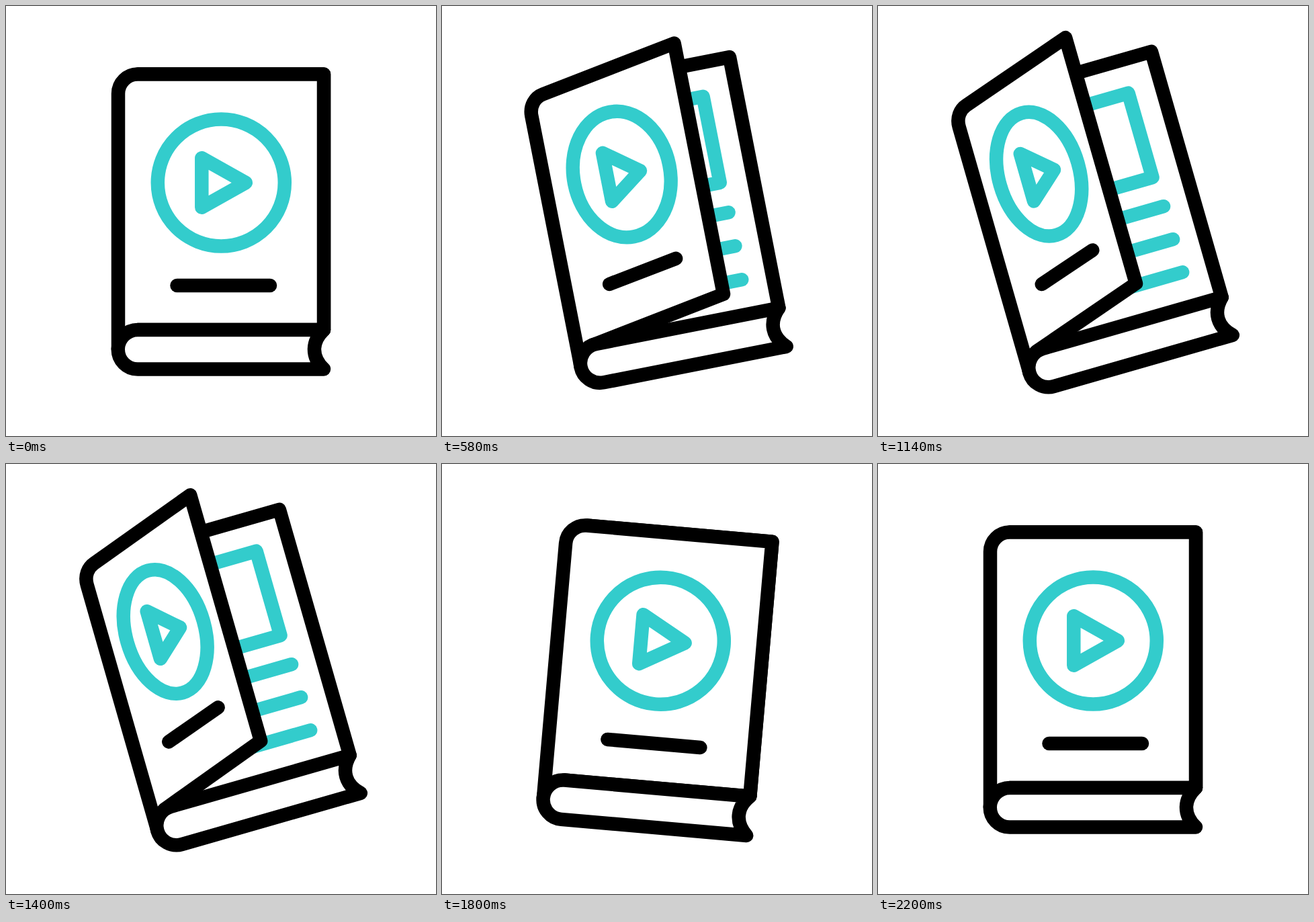
An HTML page for the animation above (2.4 s loop, 640 by 640 pixels).

```html
<!DOCTYPE html>
<html lang="en">
<head>
<meta charset="utf-8">
<title>Video book</title>
<style>
  html, body { margin: 0; height: 100%; overflow: hidden; background: #fff; }
  svg { display: block; width: 100vw; height: 100vh; }
  path, ellipse { fill: none; stroke: #000; stroke-width: 20.5; stroke-linecap: round; stroke-linejoin: round; }
  .accent { stroke: #3cc; }
  .paper { fill: #fff; }
</style>
</head>
<body>
<svg viewBox="0 0 640 640">
  <g id="book">
    <path d="M196 101.5H473V482"/>
    <path class="accent" d="M260 151.5H423V282H260M260 328H427M260 379H427M260 430H427"/>
    <path id="cover" class="paper"/>
    <ellipse id="ring" class="accent" ry="94.5"/>
    <path id="play" class="accent"/>
    <path id="bar"/>
    <path class="paper" d="M473 482H196A29.25 29.25 0 0 0 196 540.5H473C454.3 522.5 454.3 500 473 482Z"/>
  </g>
</svg>
<script>
const LOOP = 2400, STEP = 20;
const [book, cover, ring, play, bar] =
  ['book', 'cover', 'ring', 'play', 'bar'].map(id => document.getElementById(id));

// Keys are [time, value]; every span eases in and out.
const TILT = [[200, 0], [800, -16], [1400, -16], [1800, 5], [2200, 0]];
const OPEN = [[200, 0], [800, 1], [1400, 1.1], [1720, 0]];

function valueAt(keys, t) {
  if (t <= keys[0][0]) return keys[0][1];
  for (let i = 1; i < keys.length; i++) {
    const [t0, a] = keys[i - 1], [t1, b] = keys[i];
    if (t < t1) {
      const u = (t - t0) / (t1 - t0);
      return a + (b - a) * u * u * (3 - 2 * u);
    }
  }
  return keys[keys.length - 1][1];
}

function draw(t) {
  const open = valueAt(OPEN, t);
  // A point that drifts by (dx, dy) as the cover opens fully.
  const pt = (x, y, dx, dy) => `${x + dx * open} ${y + dy * open} `;

  book.setAttribute('transform', `rotate(${valueAt(TILT, t)} 320 320)`);

  cover.setAttribute('d',
    'M' + pt(196, 482, -9.5, 1.2) +
    'L' + pt(473, 482, -110.5, -52) +
    'L' + pt(473, 101.5, -110.5, -52) +
    'L' + pt(196, 101.5, -9.5, 1) +
    'C' + pt(180, 101.5, -4, 4) + pt(167, 114.5, 0, 1.5) + '167 130.5V511');

  const cx = 320.3 - 55 * open, cy = 263 - 30.5 * open, squeeze = 1 - 0.343 * open;
  ring.setAttribute('cx', cx);
  ring.setAttribute('cy', cy);
  ring.setAttribute('rx', 94.5 * squeeze);

  const left = cx - 29 * squeeze;
  play.setAttribute('d', `M${left} ${cy - 36.7}V${cy + 36.7}L${cx + 36.5 * squeeze} ${cy}Z`);

  bar.setAttribute('d', 'M' + pt(254.5, 416, -31.8, -25.1) + 'L' + pt(393, 416, -80.8, -51.4));
}

const start = performance.now();
function tick() {
  const t = (performance.now() - start) % LOOP;
  draw(Math.floor(t / STEP) * STEP);
  requestAnimationFrame(tick);
}
tick();
</script>
</body>
</html>
```
